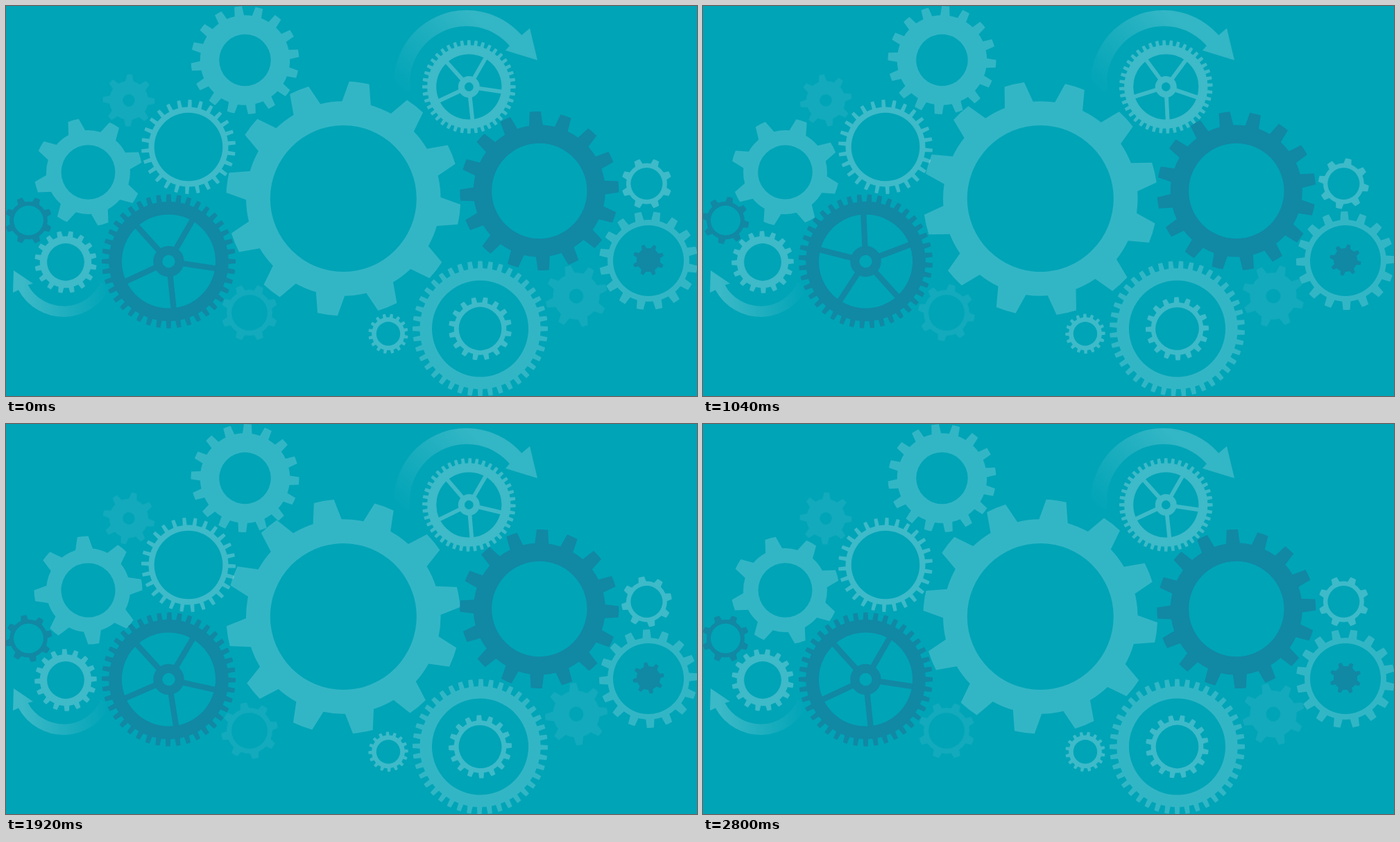
An HTML page that plays this animation: 996 px wide and 562 px high, repeating every 2880 ms.

```html
<!DOCTYPE html>
<html lang="en">
<head>
<meta charset="utf-8">
<title>Turning gears</title>
<style>
  html, body { margin: 0; width: 100%; height: 100%; overflow: hidden; background: #00a4b7; }
  svg { display: block; width: 100%; height: 100%; }
</style>
</head>
<body>
<svg id="stage" viewBox="0 0 996 562" xmlns="http://www.w3.org/2000/svg">
  <defs>
    <linearGradient id="fadeTop" gradientUnits="userSpaceOnUse" x1="568" y1="122" x2="672" y2="14">
      <stop offset="0" stop-color="#fff" stop-opacity="0"/>
      <stop offset="1" stop-color="#fff" stop-opacity=".2"/>
    </linearGradient>
    <linearGradient id="fadeLow" gradientUnits="userSpaceOnUse" x1="148" y1="400" x2="24" y2="408">
      <stop offset="0" stop-color="#fff" stop-opacity="0"/>
      <stop offset="1" stop-color="#fff" stop-opacity=".23"/>
    </linearGradient>
  </defs>
</svg>
<script>
const NS = 'http://www.w3.org/2000/svg';
const stage = document.getElementById('stage');
const STEP = 80, FRAMES = 36;
const SLOW = 360 / 119, FAST = 2 * SLOW;
const SPOKES = [-42, 30, 98.5, 174, 245];

const LIGHT = ['#fff', 0.195], PALE = ['#fff', 0.245];
const FAINT = ['#fff', 0.07], DARK = ['#1188a4', 1];

// Root and hole are shares of the radius; tip and base are shares of the tooth pitch.
const BIG = { teeth: 12, root: 0.83, hole: 0.624, tip: 0.33, base: 0.57, turn: 7.8 };
const COG = { teeth: 16, root: 0.83, hole: 0.6, tip: 0.36, base: 0.53, turn: 10 };
const BROAD = { teeth: 8, root: 0.75, hole: 0.235, tip: 0.26, base: 0.53, turn: -16 };
const RING = { teeth: 8, root: 0.805, hole: 0.63, tip: 0.3, base: 0.49, turn: 22.5 };
const FINE = { teeth: 26, root: 0.845, hole: 0.725, tip: 0.3, base: 0.42, turn: 1.8 };
const RIM = { teeth: 40, root: 0.893, hole: 0.7, tip: 0.41, base: 0.54, turn: 0 };

function add(parent, tag, attrs) {
  const el = document.createElementNS(NS, tag);
  for (const key in attrs) el.setAttribute(key, attrs[key]);
  parent.appendChild(el);
  return el;
}

// Angles in degrees, clockwise from straight up.
function point(r, deg, x = 0, y = 0) {
  const a = deg * Math.PI / 180;
  return (x + r * Math.sin(a)).toFixed(2) + ' ' + (y - r * Math.cos(a)).toFixed(2);
}

function arcTo(r, deg, sweep = 1, x = 0, y = 0) {
  return `A${r} ${r} 0 0 ${sweep} ` + point(r, deg, x, y);
}

function addArrow(fill, x, y, outer, inner, from, to, head) {
  const sweep = to > from ? 1 : 0;
  const d = 'M' + point(outer, from, x, y) + arcTo(outer, to, sweep, x, y) +
    'L' + head + 'L' + point(inner, to, x, y) + arcTo(inner, from, 1 - sweep, x, y) + 'Z';
  add(stage, 'path', { d, fill });
}

function outline(r, { teeth, root, hole, tip, base, turn }) {
  const pitch = 360 / teeth, low = r * root, bore = r * hole;
  let d = '';
  for (let i = 0; i < teeth; i++) {
    const a = turn + i * pitch;
    d += i ? arcTo(low, a - base * pitch / 2) : 'M' + point(low, a - base * pitch / 2);
    d += 'L' + point(r, a - tip * pitch / 2) + arcTo(r, a + tip * pitch / 2);
    d += 'L' + point(low, a + base * pitch / 2);
  }
  d += arcTo(low, turn - base * pitch / 2) + 'Z';
  return bore ? d + 'M' + point(bore, 0) + arcTo(bore, 180) + arcTo(bore, 360) + 'Z' : d;
}

function addSpokes(group, r, hole, color) {
  const hub = r * 0.23, bore = r * 0.095;
  add(group, 'circle', {
    r: (hub + bore) / 2, fill: 'none', stroke: color, 'stroke-width': hub - bore
  });
  const d = SPOKES.map(a => 'M' + point(hub - 2, a) + 'L' + point(r * hole + 1.5, a)).join('');
  add(group, 'path', { d, stroke: color, 'stroke-width': r * 0.085 });
}

function gear(kind, x, y, r, [color, opacity], extra) {
  const shape = { ...kind, ...extra };
  const el = add(stage, 'g', { opacity });
  add(el, 'path', { d: outline(r, shape), fill: color, 'fill-rule': 'evenodd' });
  if (shape.spoked) addSpokes(el, r, shape.hole, color);
  return { el, x, y, speed: r > 90 ? SLOW : FAST };
}

addArrow('url(#fadeTop)', 664, 111, 105, 82, -98, 49, '755 32L766 78L720 64');
addArrow('url(#fadeLow)', 83, 374, 74, 58.5, 114, 241.5, '10 413L11 381L39 400');

const wheels = [
  gear(BROAD, 822, 418, 45, FAINT),
  gear(RING, 351, 442, 41, FAINT),
  gear(BROAD, 177, 136, 37.5, FAINT, { turn: 2 }),
  gear(BIG, 486.3, 277.5, 169, LIGHT),
  gear(COG, 344.5, 78, 78, LIGHT, { hole: 0.477, turn: -7.3 }),
  gear(BROAD, 118.5, 239.5, 78, LIGHT, { root: 0.775, hole: 0.504 }),
  gear(FINE, 263, 203, 68, PALE),
  gear(RIM, 234.5, 368, 96.5, DARK, { spoked: true }),
  gear(RIM, 667.3, 116.5, 67.3, PALE, { spoked: true }),
  gear(COG, 768.8, 266.5, 114.5, DARK, { turn: -3 }),
  gear(RIM, 683.5, 465, 97.5, LIGHT, { hole: 0.713 }),
  gear(COG, 683.5, 465, 45.5, PALE, { hole: 0.69 }),
  gear(COG, 551, 472.3, 28.7, PALE),
  gear(COG, 86, 369, 44.8, PALE),
  gear(RING, 32.5, 309, 34, DARK),
  gear(RING, 923.4, 256, 36.5, PALE),
  gear(COG, 926, 367, 71, LIGHT, { hole: 0.718 }),
  gear(BROAD, 926, 366, 22.7, DARK, { hole: 0, turn: 24 })
];

function draw(ms) {
  // The last step shows the starting pose again.
  const step = Math.floor(ms / STEP) % FRAMES % (FRAMES - 1);
  for (const { el, x, y, speed } of wheels) {
    el.setAttribute('transform', `translate(${x} ${y}) rotate(${(step * speed).toFixed(3)})`);
  }
}

const begin = performance.now();
function tick() {
  draw(performance.now() - begin);
  requestAnimationFrame(tick);
}
draw(0);
requestAnimationFrame(tick);
</script>
</body>
</html>
```
